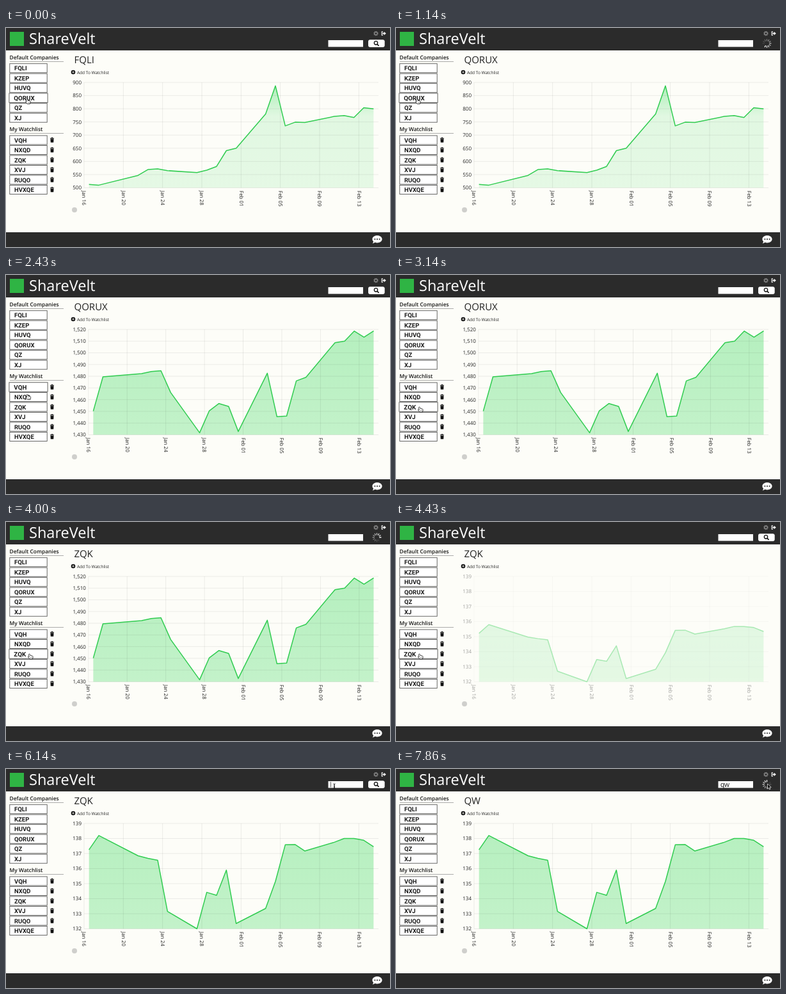
An HTML page that plays this animation: 600x342 px, repeating every 8 s.

```html
<!DOCTYPE html>
<html lang="en">
<head>
<meta charset="utf-8">
<title>Stock dashboard</title>
<style>
html, body { margin: 0; width: 100%; height: 100%; overflow: hidden; background: #fdfdf8; }
svg { display: block; width: 100%; height: 100%; font-family: 'Open Sans', sans-serif; text-rendering: geometricPrecision; }
.heading { font-size: 8.4px; font-weight: 600; fill: #151515; }
.ticker { font: 700 9.5px Roboto, sans-serif; font-stretch: 75%; fill: #1c1c1c; }
.axis { font-size: 8px; fill: #222; }
.grid { stroke: #000; stroke-opacity: .07; fill: none; }
.line { fill: none; stroke: #30cc50; stroke-width: 1.5; stroke-linejoin: round; }
</style>
</head>
<body>
<svg id="stage" viewBox="0 0 600 342">
  <defs>
    <linearGradient id="shade" x1="0" y1="85" x2="0" y2="249.5" gradientUnits="userSpaceOnUse">
      <stop offset="0" stop-color="#35d758" stop-opacity=".36"/>
      <stop offset="1" stop-color="#35d758" stop-opacity=".29"/>
    </linearGradient>
    <linearGradient id="peakShade" x1="0" y1="85" x2="0" y2="249.5" gradientUnits="userSpaceOnUse">
      <stop offset="0" stop-color="#35d758" stop-opacity=".42"/>
      <stop offset=".32" stop-color="#35d758" stop-opacity=".14"/>
      <stop offset="1" stop-color="#35d758" stop-opacity=".12"/>
    </linearGradient>
  </defs>
  <rect width="600" height="342" fill="#fdfdf8"/>
  <rect width="600" height="35" fill="#2b2b2b"/>
  <rect y="319" width="600" height="23" fill="#2b2b2b"/>
  <rect x="6" y="6" width="22" height="22" fill="#2fb444"/>
  <text x="36" y="25.3" font-size="23.5" font-weight="500" fill="#fff">ShareVelt</text>

  <!-- header icons -->
  <g fill="none" stroke="#858585">
    <circle cx="578" cy="8.5" r="2.2" stroke-width="1.4"/>
    <circle cx="578" cy="8.5" r="3.2" stroke-width="1.1" stroke-dasharray="1.25 1.26"/>
  </g>
  <path d="M589 5.8H587.2V11.2H589" fill="none" stroke="#fff" stroke-width="1.1"/>
  <path d="M588.4 7.6h2.3V5.7L593.8 8.5 590.7 11.3V9.4h-2.3z" fill="#fff"/>
  <rect x="503.5" y="19" width="54.5" height="10.5" fill="#fff"/>
  <text id="query" x="507" y="27.6" font-size="11" fill="#222" font-family="'Liberation Sans', sans-serif"></text>
  <path id="caret" d="M507.5 20v8.5" stroke="#222" stroke-width=".7"/>
  <g id="searchButton">
    <rect x="566" y="18.3" width="25.700" height="11.700" rx="3" fill="#fff"/>
    <circle cx="578" cy="23.3" r="2.7" fill="none" stroke="#111" stroke-width="1.3"/>
    <path d="M580 25.4l2.6 2.5" stroke="#111" stroke-width="1.6"/>
  </g>
  <g id="spinner" fill="#fff"></g>

  <!-- sidebar -->
  <text class="heading" x="5.5" y="49.3">Default Companies</text>
  <text class="heading" x="5.5" y="161.3">My Watchlist</text>
  <path d="M6 52.5h84M6 164.5h84" stroke="#999" stroke-width=".8"/>
  <g id="sidebar"></g>

  <!-- main panel -->
  <text id="heading" x="106.5" y="55" font-size="15" fill="#222"></text>
  <circle cx="105" cy="69" r="3.3" fill="#111"/>
  <path d="M103.2 69h3.6M105 67.2v3.6" stroke="#fdfdf8" stroke-width=".8"/>
  <text x="111" y="71.5" font-size="6.5" fill="#222">Add To Watchlist</text>
  <g id="charts"></g>
  <circle cx="107" cy="284" r="4" fill="#cfcfcc"/>

  <!-- chat -->
  <path d="M580 324c4.400 0 7.600 2.500 7.600 5.700s-3.200 5.700-7.600 5.700c-1.200 0-2.400-.2-3.400-.6-1 .9-2.500 1.500-4 1.500.9-.9 1.400-1.900 1.500-2.800-1.100-1-1.700-2.300-1.700-3.800 0-3.200 3.200-5.700 7.600-5.700z" fill="#fff"/>
  <g fill="#2b2b2b"><circle cx="576.4" cy="329.7" r="1.05"/><circle cx="580" cy="329.7" r="1.05"/><circle cx="583.6" cy="329.7" r="1.05"/></g>

  <!-- pointers -->
  <g id="hand" stroke="#111" stroke-width=".8" stroke-linejoin="round" fill="#fff">
    <path d="M-2.200-3.600c.8-.7 1.500-.2 1.700.6l.5 1.500 3 .6c1 .3 1.300 1 1.100 2L3.500 4H-.8L-3.400.9c-.4-.8.4-1.300 1.100-.8l.6.4-1-3.200c-.1-.4.1-.7.5-.9z"/>
    <path d="M.6 1v1.600M2.200 1.200v1.400" stroke-width=".5"/>
  </g>
  <path id="arrow" d="M-1-4v8l1.900-1.700 1.200 2.700 1.300-.6-1.200-2.600h2.500z" fill="#000" stroke="#fff" stroke-width=".7"/>
  <path id="beam" d="M-1.600-4Q0-4 0-3V3Q0 4-1.600 4M1.600-4Q0-4 0-3V3Q0 4 1.600 4M-1 1H1" fill="none" stroke="#111" stroke-width=".8"/>
</svg>
<script>
const LOOP = 8000, TOP = 85, BASE = 249.5, RIGHT = 582;
const $ = id => document.getElementById(id);

function add(parent, tag, attrs, text) {
  const el = document.createElementNS('http://www.w3.org/2000/svg', tag);
  for (const key in attrs) el.setAttribute(key, attrs[key]);
  if (text !== undefined) el.textContent = text;
  return parent.appendChild(el);
}
const show = (el, on) => el.setAttribute('display', on ? 'inline' : 'none');
const clamp = v => Math.max(0, Math.min(1, v));
const smooth = v => v * v * (3 - 2 * v);

// Sidebar
const buttons = {};
function addButton(name, y, removable) {
  const g = add($('sidebar'), 'g', { transform: `translate(35 ${y})` });
  const inner = add(g, 'g', {});
  add(inner, 'rect', { x: -29.2, y: -7, width: 58.4, height: 14, fill: '#fff', stroke: '#555', 'stroke-width': .9 });
  add(inner, 'text', { class: 'ticker', x: -22, y: 3.5 }, name);
  if (removable) {
    add(g, 'path', { d: 'M34-2.800h6M36-3.600h2', stroke: '#111', 'stroke-width': 1.1 });
    add(g, 'path', { d: 'M34.400-1.700h5.200L39.200 3.800h-4.400z', fill: '#111' });
  }
  buttons[name] = inner;
}
['FQLI', 'KZEP', 'HUVQ', 'QORUX', 'QZ', 'XJ'].forEach((n, i) => addButton(n, 62.7 + 15.5 * i));
['VQH', 'NXQD', 'ZQK', 'XVJ', 'RUQO', 'HVXQE'].forEach((n, i) => addButton(n, 175 + 15.5 * i, true));

// Charts: one value per trading day
const days = [0, 1, 5, 6, 7, 8, 11, 12, 13, 14, 15, 18, 19, 20, 21, 22, 25, 26, 27, 28, 29];
const dates = ['Jan 16', 'Jan 20', 'Jan 24', 'Jan 28', 'Feb 01', 'Feb 05', 'Feb 09', 'Feb 13'];

function makeChart({ start, left, min, max, step, shade, values }) {
  const group = add($('charts'), 'g', {});
  const cell = (RIGHT - left) / 30;
  const yOf = v => BASE - (v - min) / (max - min) * (BASE - TOP);
  const area = add(group, 'path', { fill: `url(#${shade})` });
  for (let v = min; v <= max; v += step) {
    add(group, 'path', { class: 'grid', d: `M${left} ${yOf(v)}H${RIGHT}` });
    add(group, 'text', { class: 'axis', x: left - 4, y: yOf(v) + 2.9, 'text-anchor': 'end' }, v.toLocaleString('en-US'));
  }
  dates.forEach((date, i) => {
    const x = left + cell * 4 * i;
    add(group, 'path', { class: 'grid', d: `M${x} ${TOP}V${BASE}` });
    add(group, 'text', { class: 'axis', transform: `translate(${x - 2.6} 254) rotate(90)` }, date);
  });
  const line = add(group, 'path', { class: 'line' });
  const xOf = day => left + cell * (day + .5);

  function draw(t) {
    const rise = 1 - (1 - clamp((t - start) / 1000)) ** 3;
    const points = days.map((d, i) => `${xOf(d).toFixed(2)} ${(BASE - rise * (BASE - yOf(values[i]))).toFixed(2)}`);
    const d = 'M' + points.join('L');
    line.setAttribute('d', d);
    area.setAttribute('d', `${d}V${BASE}H${xOf(0)}z`);
    group.setAttribute('opacity', rise ** 1.8);
  }
  return { start, group, draw };
}

const charts = [
  { start: -2000, left: 122, min: 500, max: 900, step: 50, shade: 'peakShade',
    values: [513, 510, 547, 569, 572, 565, 558, 567, 581, 641, 650, 780, 887, 735, 749, 748, 771, 774, 767, 804, 800] },
  { start: 1230, left: 128.8, min: 1430, max: 1520, step: 10, shade: 'shade',
    values: [1450.2, 1479.5, 1482.3, 1484, 1484.7, 1466.2, 1431.7, 1450.5, 1456.7, 1454.2, 1432.8,
      1482.6, 1445.4, 1446, 1476, 1479.1, 1508.7, 1510, 1518.6, 1513.4, 1518.7] },
  { start: 4160, left: 122, min: 132, max: 139, step: 1, shade: 'shade',
    values: [137.25, 138.2, 136.85, 136.68, 136.55, 133.15, 132, 134.42, 134.22, 135.9, 132.35,
      133.35, 135.15, 137.58, 137.6, 137.17, 137.75, 138, 138, 137.88, 137.45] }
].map(makeChart);

// Spinner: twelve blades fading in turn
const blades = Array.from({ length: 12 }, (_, i) =>
  add($('spinner'), 'rect', { x: -.65, y: -7, width: 1.3, height: 3.4, rx: .5, transform: `translate(579.5 24) rotate(${i * 30})` }));

// Timeline: [time, value]
const titles = [[0, 'FQLI'], [270, 'QORUX'], [3560, 'ZQK'], [7700, 'QW']];
const hovers = [[0, 'QORUX'], [2080, 'QZ'], [2160, 'XJ'], [2240, ''], [2320, 'VQH'], [2480, 'NXQD'], [2720, 'ZQK'], [4850, '']];
const queries = [[0, ''], [6500, 'q'], [6800, 'qw']];
const loads = [[270, 1230], [3560, 4160], [7700, LOOP]];
const pointer = [
  [0, 34, 114.5], [1900, 34, 114.5], [2430, 34.5, 190.5], [2900, 38, 210], [4750, 38, 210],
  [5600, 530, 14], [5860, 513, 27], [7000, 513, 27], [7450, 581.5, 27], [LOOP, 581.5, 27]
];
const at = (list, t) => list.filter(([start]) => start <= t).pop()[1];

function drawPointer(t, loading) {
  const i = pointer.findIndex(p => p[0] > t);
  const [t0, x0, y0] = pointer[i - 1], [t1, x1, y1] = pointer[i];
  const k = smooth((t - t0) / (t1 - t0));
  const x = x0 + (x1 - x0) * k, y = y0 + (y1 - y0) * k;
  const inRow = y > 18 && y < 30;
  const onButton = x < 65 || (inRow && x > 566 && !loading);
  const kind = onButton ? 'hand' : inRow && x > 503 && x < 558 ? 'beam' : 'arrow';
  for (const id of ['hand', 'arrow', 'beam']) show($(id), id === kind);
  $(kind).setAttribute('transform', `translate(${x} ${y})`);
}

function render(t) {
  const chart = charts.filter(c => c.start <= t).pop();
  charts.forEach(c => show(c.group, c === chart));
  chart.draw(t);

  $('heading').textContent = at(titles, t);
  $('query').textContent = at(queries, t);
  show($('caret'), t > 5860 && t < 6500 && (t - 5860) % 1000 < 500);

  const hover = at(hovers, t);
  for (const name in buttons) buttons[name].setAttribute('transform', `scale(${name === hover ? 1.03 : 1})`);

  const load = loads.find(([from, to]) => t >= from && t < to);
  show($('searchButton'), !load);
  show($('spinner'), load);
  if (load) {
    const phase = (t - load[0]) / 1200;
    blades.forEach((b, i) => b.setAttribute('opacity', 1 - (phase + (11 - i) / 12) % 1));
  }
  drawPointer(t, load);
}

function tick() {
  render(performance.now() % LOOP);
  requestAnimationFrame(tick);
}
tick();
</script>
</body>
</html>
```
